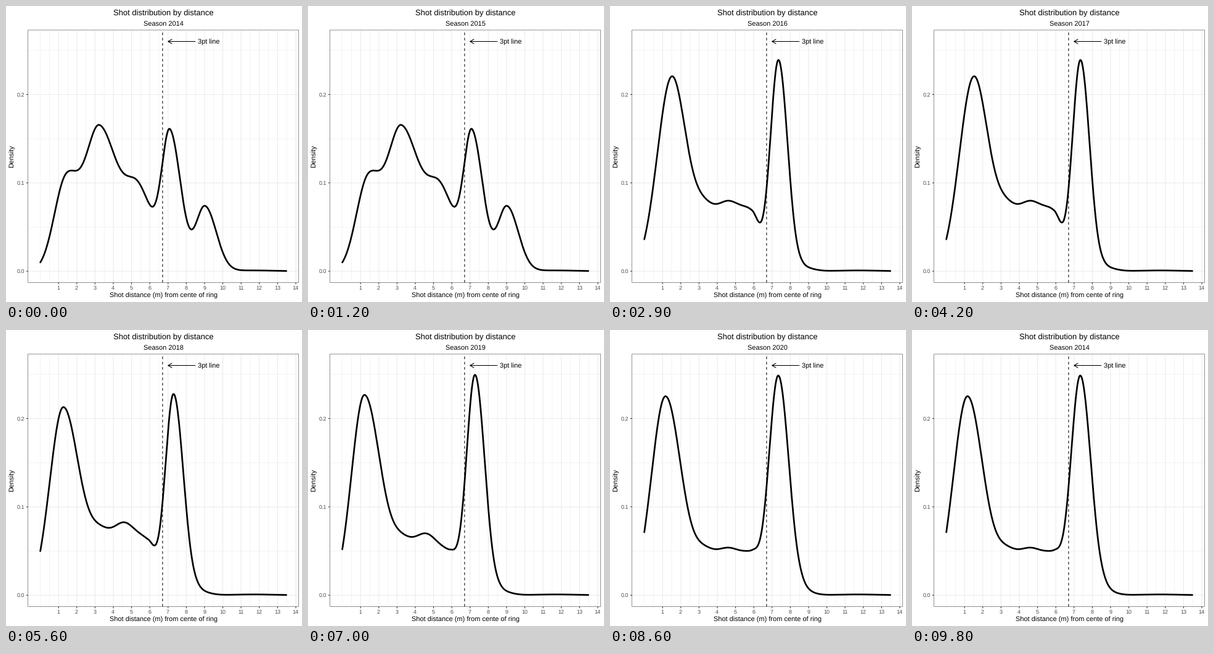
These frames come from a looping animation (480x480 px, 10000 ms). A matplotlib script:

```python
import numpy as np
import matplotlib.pyplot as plt
from matplotlib.animation import FuncAnimation

plt.rcParams["font.family"] = "Liberation Sans"
plt.rcParams["text.hinting"] = "none"

SIZE, DPI = 480, 96
PT = 72 / DPI                       # points per pixel
LEFT, RIGHT, TOP, BOTTOM = 35.7, 474.5, 39.0, 448.5
LINE = 1.067
DARK, TICK, GRID = "#333333", "#4d4d4d", "#ebebeb"

STEP = 100
LOOP = 10000
STARTS = np.array([1200, 2700, 4200, 5600, 7000, 8400, 9800])
LAG = 200                           # the curve follows the heading

x = np.linspace(0, 13.48, 700)


def px(metre):
    return 55.6 + 29.6 * metre


def py(density):
    return 430.1 - 1433 * density


def density(*bumps):
    """Sum of two-sided bell curves: height (thousandths), centre, widths."""
    total = 0.9 * np.exp(-((x - 11.7) / 1.2) ** 2 / 2)
    for height, centre, left, right in bumps:
        width = np.where(x < centre, left, right)
        total += height * np.exp(-((x - centre) / width) ** 2 / 2)
    return total / 1000


def modern(close, mid, three):
    """Peaks near the ring and behind the line, with a mid-range plateau."""
    near, centre, far = mid
    return density(close, (near, 3.3, .65, .65), (centre, 4.6, .65, .65),
                   (far, 5.9, .65, .42), three, (4, 8.7, .3, .55))


SEASONS = [
    density((101, 1.4, .65, .7), (161, 3.24, .77, .98), (86, 5.4, .75, .8),
            (152, 7.11, .45, .6), (73, 9.02, .5, .62)),
    modern((216, 1.27, .68, .88), (47, 67, 74), (246, 7.35, .44, .485)),
    modern((219.3, 1.51, .795, .8), (57, 64, 59), (238.9, 7.35, .45, .5)),
    modern((212.5, 1.26, .74, .9), (54, 68, 52), (227.5, 7.3, .46, .54)),
    modern((226.4, 1.21, .705, .9), (47, 58, 40), (249.2, 7.27, .475, .535)),
    modern((247, 1.01, .645, .92), (43, 50, 35), (245.8, 7.28, .475, .545)),
    modern((225, 1.16, .765, .87), (40, 43, 40), (248.5, 7.34, .52, .58)),
]

fig = plt.figure(figsize=(SIZE / DPI, SIZE / DPI), dpi=DPI, facecolor="white")
ax = fig.add_axes([0, 0, 1, 1])
ax.set(xlim=(0, SIZE), ylim=(SIZE, 0))
ax.axis("off")


def stroke(xs, ys, color="black", width=LINE, cap="butt", **kw):
    return ax.plot(xs, ys, color=color, lw=width * PT, snap=False,
                   solid_capstyle=cap, **kw)[0]


def label(x, y, text, size, color="black", ha="center", **kw):
    return ax.text(x, y, text, fontsize=size * PT, color=color, ha=ha,
                   va="baseline", **kw)


def vgrid(values, width):
    for gx in px(values):
        stroke([gx, gx], [TOP, BOTTOM], GRID, width)


def hgrid(values, width):
    for gy in py(values):
        stroke([LEFT, RIGHT], [gy, gy], GRID, width)


metres = np.arange(1, 15)
levels = np.array([0, .1, .2])
hgrid(levels + .05, LINE / 2)
vgrid(np.append(0, metres - .5), LINE / 2)
hgrid(levels, LINE)
vgrid(metres, LINE)

curve = stroke(px(x), py(SEASONS[0]), width=2.7, cap="round",
               solid_joinstyle="round")

# Three-point line with its arrow
line_x = px(6.7)
stroke([line_x, line_x], [BOTTOM, TOP], ls=(0, (4, 4)), dash_capstyle="butt")
tip, tail, arrow_y = px(7), px(8.5), py(.26)
stroke([tip, tail], [arrow_y, arrow_y])
dx, dy = 7.2 * np.cos(np.pi / 6), 7.2 * np.sin(np.pi / 6)
stroke([tip + dx, tip, tip + dx], [arrow_y - dy, arrow_y, arrow_y + dy],
       cap="round", solid_joinstyle="round")
label(px(9.25) - .4, 62, "3pt line", 11)

# Frame, ticks and texts
stroke([LEFT, RIGHT, RIGHT, LEFT, LEFT], [TOP, TOP, BOTTOM, BOTTOM, TOP],
       DARK, LINE / 2, solid_joinstyle="miter")
for m in metres:
    stroke([px(m)] * 2, [BOTTOM, BOTTOM + 2.75], DARK)
    label(px(m) - .3, 460.2, str(m), 9, TICK)
for v in levels:
    stroke([LEFT - 2.75, LEFT], [py(v)] * 2, DARK)
    label(30.4, py(v) + 3.2, f"{v:.1f}", 9, TICK, ha="right")

mid_x, mid_y = (LEFT + RIGHT) / 2, (TOP + BOTTOM) / 2
label(mid_x, 15.2, "Shot distribution by distance", 13)
season = label(mid_x, 32, "", 11)
label(mid_x, 473.2, "Shot distance (m) from cente of ring", 11)
label(13.3, mid_y, "Density", 11, rotation=90, rotation_mode="anchor")


def update(frame):
    t = frame * STEP
    year = np.sum(t >= STARTS) % len(SEASONS)
    shape = np.sum(t >= STARTS + LAG)
    season.set_text(f"Season {2014 + year}")
    curve.set_ydata(py(SEASONS[shape]))
    return season, curve


anim = FuncAnimation(fig, update, frames=LOOP // STEP, interval=STEP,
                     repeat=True, repeat_delay=0)
plt.show()
```
